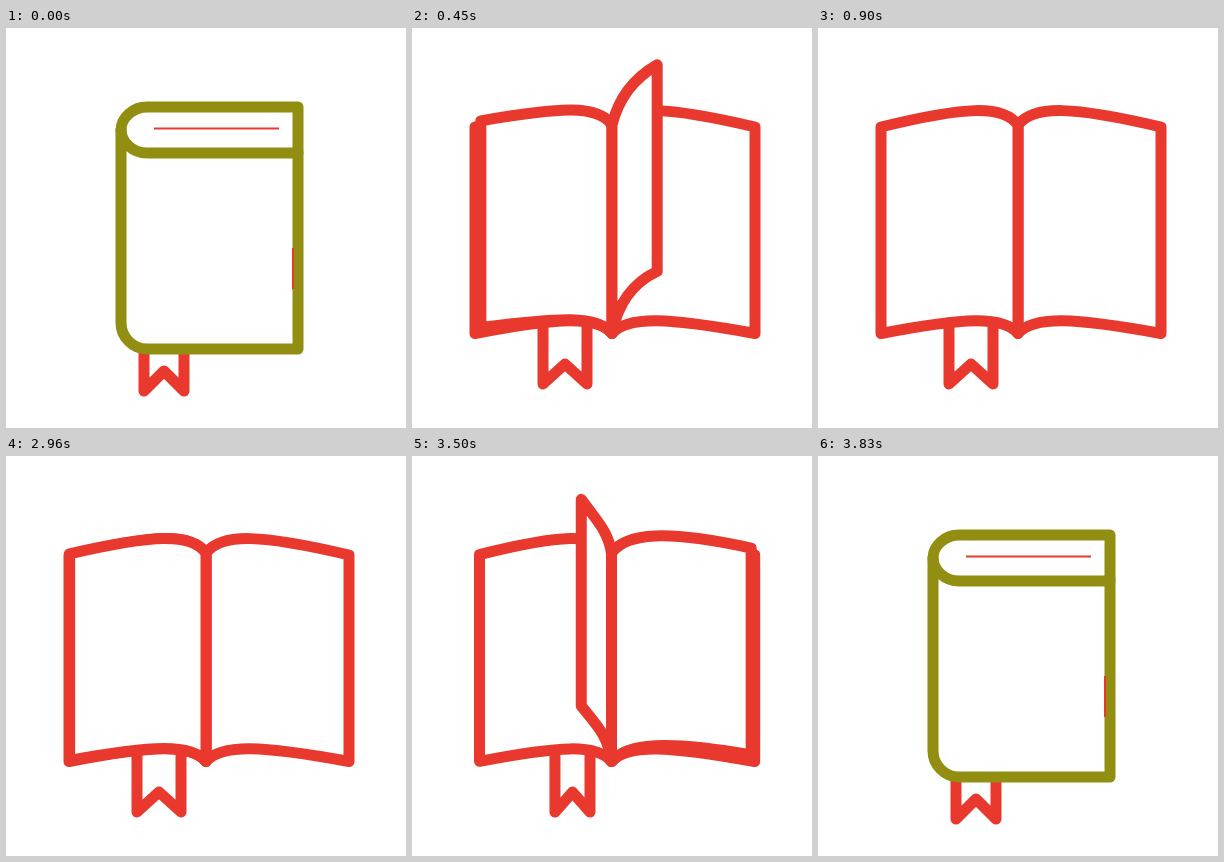
Recreate the animation shown at these times as an HTML page with a canvas. Size 400 by 400 pixels, loop 4.86 s.

```html
<!DOCTYPE html>
<html lang="en">
<head>
<meta charset="utf-8">
<title>Book</title>
<style>
  html, body { margin: 0; width: 100%; height: 100%; overflow: hidden; background: #fff; }
  canvas { display: block; width: 400px; height: 400px; }
</style>
</head>
<body>
<canvas id="stage"></canvas>
<script>
const RED = '#e9382d', OLIVE = '#918e11', LINE = 11;
const LOOP = 4860, STEP = 30, CLOSE_AT = 2960, CLOSED_AT = 3830;
const OPENING = { starts: [96, 293, 490], length: 390, side: 1 };
const CLOSING = { starts: [2948, 3134, 3333], length: 394, side: -1 };

const canvas = document.getElementById('stage');
const ctx = canvas.getContext('2d');
const ratio = window.devicePixelRatio || 1;
canvas.width = canvas.height = 400 * ratio;
ctx.scale(ratio, ratio);
ctx.lineJoin = ctx.lineCap = 'round';

const clamp = v => Math.max(0, Math.min(1, v));
const mix = (a, b, k) => a + (b - a) * k;
const smooth = k => k * k * k * (10 + k * (6 * k - 15));

function paint(color, fill = true, width = LINE) {
  if (fill) {
    ctx.fillStyle = '#fff';
    ctx.fill();
  }
  ctx.strokeStyle = color;
  ctx.lineWidth = width;
  ctx.stroke();
}

function segment(x1, y1, x2, y2) {
  ctx.beginPath();
  ctx.moveTo(x1, y1);
  ctx.lineTo(x2, y2);
  paint(RED, false, 2);
}

// A sheet hinged at the spine; dx is the reach of its free edge.
function sheet(book, spine, dx, lift) {
  const { top, height, curl } = book;
  const y1 = top - 20.5 * curl;
  const y2 = top - 18.5 * curl - lift * (0.28 + 0.003 * dx);
  const yEnd = top + 2 * curl - lift;
  const x1 = spine + 0.11 * dx, x2 = spine + 0.39 * dx, xEnd = spine + dx;
  const drop = height + (2.5 - 0.12 * lift) * curl;
  ctx.beginPath();
  ctx.moveTo(spine, top);
  ctx.bezierCurveTo(x1, y1, x2, y2, xEnd, yEnd);
  ctx.lineTo(xEnd, yEnd + height - 2 * curl);
  ctx.bezierCurveTo(x2, y2 + drop, x1, y1 + drop, spine, top + height);
  ctx.closePath();
  paint(RED);
}

// Outside of the front cover, with the rounded back at its left.
function frontCover(left, width, lift, grow) {
  const right = left + width;
  const r = Math.min(26, width / 2);
  const top = mix(91, 79, grow), band = mix(97, 125, grow), bottom = mix(312, 321, grow);
  const mid = (top + band) / 2;
  const curve = left + r;
  const rise = lift * (width - r) / Math.max(width, 1);
  const near = lift - rise;

  ctx.beginPath();
  ctx.moveTo(right, top - lift);
  ctx.lineTo(curve, top - near);
  ctx.bezierCurveTo(curve - r * 0.55, top - near, left, mid - 12 * grow, left, mid);
  ctx.lineTo(left, bottom - 26);
  ctx.bezierCurveTo(left, bottom - 12, curve - r * 0.55, bottom - near, curve, bottom - near);
  ctx.lineTo(right, bottom - lift);
  ctx.closePath();
  paint(OLIVE);

  ctx.beginPath();
  ctx.moveTo(left, mid);
  ctx.bezierCurveTo(left, mid + 12 * grow, curve - r * 0.55, band - near, curve, band - near);
  ctx.lineTo(right, band - lift);
  paint(OLIVE, false);
}

function ribbon(shift, k) {
  const left = mix(mix(131, 143, shift), 138, k);
  const right = mix(175, 178, shift);
  const top = mix(295, 321, k), tip = mix(356, 363, k);
  ctx.beginPath();
  ctx.moveTo(left, top);
  ctx.lineTo(left, tip);
  ctx.lineTo((left + right) / 2, tip - 20);
  ctx.lineTo(right, tip);
  ctx.lineTo(right, top);
  paint(RED);
}

function turningSheets(t, turn, shut, k) {
  const radius = mix(140, 165, k);
  return turn.starts
    .map(start => (t - start) / turn.length)
    .filter(p => p > 0 && p < 1)
    .map(p => {
      const v = turn.side * Math.cos(Math.PI * p);
      const lift = Math.pow(Math.sin(Math.PI * p), 1.5) * (63.5 + 14 * v - 11 * v * v);
      return { dx: mix(3, 0, k) + radius * v, lift: lift * (1 - Math.pow(shut, 1.5)) };
    })
    .sort((a, b) => Math.abs(b.dx) - Math.abs(a.dx));
}

function draw(time) {
  const closing = time >= CLOSE_AT;
  const t = closing
    ? Math.min(CLOSED_AT, CLOSE_AT + Math.floor((time - CLOSE_AT) / STEP) * STEP)
    : Math.floor(time / STEP) * STEP;

  // 0 = lying open, 1 = shut
  const shut = closing ? clamp((t - 3468) / 362) : clamp((380 - t) / 370);
  const shift = closing ? clamp((t - 3440) / 60) : clamp((420 - t) / 60);
  const k = smooth(shut);
  const spine = mix(200, 115, k);
  const book = { top: mix(97, 80, k), height: mix(208.5, 240, k), curl: 1 - k };
  const swing = Math.cos(Math.PI * shut);
  const coverReach = mix(137, 177, k) * Math.abs(swing);
  const coverLift = 40 * Math.pow(Math.sin(Math.PI * shut), 4);

  ctx.fillStyle = '#fff';
  ctx.fillRect(0, 0, 400, 400);
  ribbon(shift, k);

  const inner = spine + 20 * k;
  sheet(book, inner, mix(343, 291.5, k) - inner, 0);
  if (swing > 0) sheet(book, spine, -coverReach, coverLift);
  for (const s of turningSheets(t, closing ? CLOSING : OPENING, shut, k)) {
    sheet(book, spine, s.dx, s.lift);
  }
  if (swing <= 0) frontCover(spine, coverReach, coverLift, smooth(clamp(shut * 2 - 1)));

  if (shut === 1) {
    ctx.lineCap = 'butt';
    segment(148, 100.5, 273, 100.5);
    segment(287, 220, 287, 261);
    ctx.lineCap = 'round';
  }
}

const begin = performance.now();
function tick() {
  draw((performance.now() - begin) % LOOP);
  requestAnimationFrame(tick);
}
tick();
</script>
</body>
</html>
```
